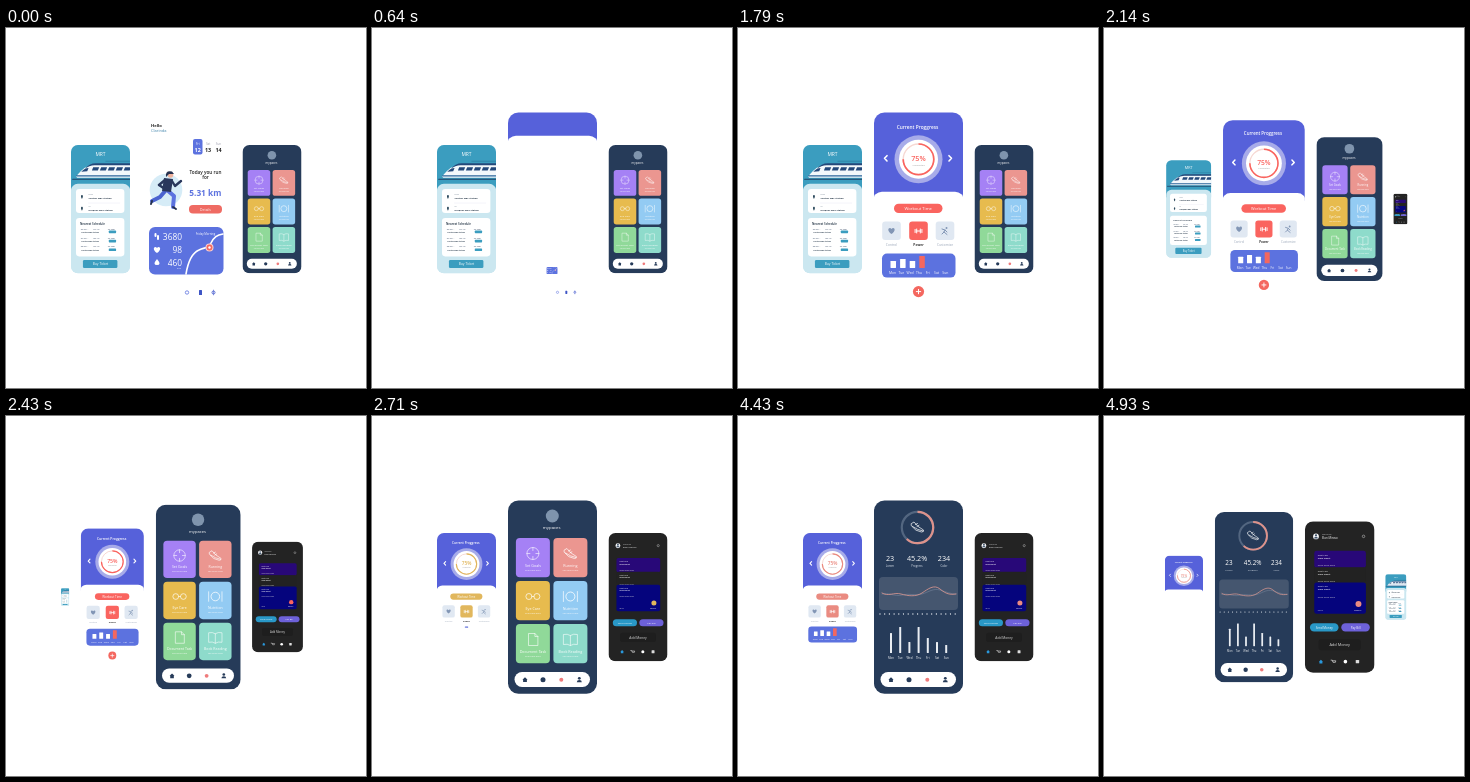
An HTML page that plays this animation: 360x360 px, repeating every 5 s.

```html
<!DOCTYPE html>
<html lang="en">
<head>
<meta charset="utf-8">
<title>App screens</title>
<style>
html, body { margin: 0; width: 100%; height: 100%; overflow: hidden; background: #fff; }
svg { display: block; width: 100vw; height: 100vh; }
text { font-family: "Open Sans", "Noto Sans", sans-serif; }
</style>
</head>
<body>
<svg id="stage" viewBox="0 0 360 360"></svg>
<script>
const LOOP = 5000, FPS = 14;
const NAVY = '#263b59', BLUE = '#5c72df', RED = '#f4675f', TEAL = '#3b9dbf', ACC = 'var(--acc)';

// drawing helpers; every phone is drawn at its centre-stage size
const rect = (x, y, w, h, r, fill) => `<rect x="${x}" y="${y}" width="${w}" height="${h}" rx="${r}" fill="${fill}"/>`;
const disc = (x, y, r, fill) => `<circle cx="${x}" cy="${y}" r="${r}" fill="${fill}"/>`;
const ring = (x, y, r, color, w, extra = '') =>
  `<circle cx="${x}" cy="${y}" r="${r}" fill="none" stroke="${color}" stroke-width="${w}" ${extra}/>`;
const line = (d, color, w, extra = '') =>
  `<path d="${d}" fill="none" stroke="${color}" stroke-width="${w}" stroke-linecap="round" stroke-linejoin="round" ${extra}/>`;
const shape = (d, fill) => `<path d="${d}" fill="${fill}"/>`;
const text = (x, y, size, str, fill, weight = 400, anchor = 'middle', id = '') =>
  `<text x="${x}" y="${y}" font-size="${size}" fill="${fill}" font-weight="${weight}" text-anchor="${anchor}" ${id && `id="${id}"`}>${str}</text>`;
const left = (x, y, size, str, fill, weight) => text(x, y, size, str, fill, weight, 'start');
const group = (id, ...parts) => `<g id="${id}">${parts.join('')}</g>`;
const at = (x, y, body) => `<g transform="translate(${x} ${y})">${body}</g>`;
const days = ['Mon', 'Tue', 'Wed', 'Thu', 'Fri', 'Sat', 'Sun'];

const heart = c => shape('M0 3C-6 -1 -2 -5 0 -2C2 -5 6 -1 0 3Z', c);
const weights = c => line('M-3.4 -1.5V1.5M-1.8 -2V2M1.8 -2V2M3.4 -1.5V1.5M-1.8 0H1.8', c, 1);
const figure = c => disc(1.5, -3, 1, c) + line('M-3 -2L0 -1L2 1M0 -1L-1 1L-3 3M-1 1L2 3.5', c, 1);
const person = c => disc(0, -1.4, 1.4, c) + shape('M-2.5 2.5Q-2.5 .3 0 .3T2.5 2.5Z', c);
const house = c => shape('M-2.6 0L0 -2.5L2.6 0H1.9V2.4H-1.9V0Z', c);
const shoe = c => line('M-6 -3.5L-3.5 -5Q0 0 6 3Q6.5 5 4 5Q-2 4.5 -6 -1ZM-2 -2.5L0 -3.5M-.5 -.5L1.5 -1.7M-5 -.5Q0 3 5.5 4', c, .7);

function ticketPhone() {
  const row = (y, i) => left(-30, y, 3.6, `0${6 + i}.30`, NAVY) + left(-20, y, 3.4, '–', '#888') +
    left(-11, y, 3.6, `0${7 + i}.10`, NAVY) + left(11, y, 3.4, '40 min', NAVY) +
    left(-29, y + 4.6, 2.7, 'Central MRT Station', '#345', 700) + rect(12.5, y + 1.5, 11, 4, 1, TEAL);
  const stop = (y, label, name) => shape(`M-28 ${y + 4}C-33 ${y - 4} -23 ${y - 4} -28 ${y + 4}Z`, '#2d4a5d') +
    left(-18, y - 2, 2.6, label, '#678') + left(-18, y + 4, 3.5, name, '#234', 700);
  const windows = Array.from({ length: 5 }, (_, i) =>
    shape(`M${-13 + i * 12} -58L${-11 + i * 12} -63H${-2 + i * 12}L${-4 + i * 12} -58Z`, '#24487a')).join('');
  return at(180.5, 181,
    rect(-45, -97, 90, 194, 0, '#cbe7f0') + rect(-45, -97, 90, 74, 0, TEAL) +
    text(0, -80, 7.4, 'MRT', '#fff') +
    shape('M-37 -49Q-24 -66 -9 -67H45V-47H-35Z', '#f3f8fb') +
    shape('M-24 -60Q-17 -69 -7 -69H45V-66H-9Q-17 -66 -24 -60Z', '#24487a') +
    shape('M-29 -56Q-24 -62 -18 -62L-20 -57Z', '#24487a') + windows +
    line('M-36 -50H45', '#2b659b', 2) + line('M-42 -45H45', '#1e4267', 1.6) + line('M8 -72H45', '#276b91', .7) +
    rect(-45, -38, 90, 145, 11, '#cbe7f0') +
    rect(-37, -30, 73, 36, 5, '#fff') + stop(-19, 'From', 'Central MRT Station') +
    line('M-18 -9H29', '#dde', .5) + stop(-1.5, 'To', 'Harbour MRT Station') +
    rect(-37, 13.5, 73, 58, 5, '#fff') + left(-31, 23.5, 4.5, 'Nearest Schedule', '#234', 600) +
    [31, 45, 58].map(row).join('') +
    rect(-26.5, 77, 52, 12, 2, TEAL) + text(0, 85, 5, 'Buy Ticket', '#fff'));
}

function runPage() {
  return group('runTop', left(145, 98.7, 4.2, 'Hello', '#222', 700), left(145, 104, 4, 'Clarinda', '#4386ad'),
      rect(187, 111, 9.5, 15.5, 2, BLUE),
      ['Fri', 'Sat', 'Sun'].map((d, i) => text(191.7 + i * 10.4, 116.5, 3, d, i ? '#99a' : '#fff') +
        text(191.7 + i * 10.4, 124, 5.4, 12 + i, i ? '#222' : '#fff', 700)).join('')) +
    group('runMid', disc(160, 162, 16.3, '#d6ecf7'),
      line('M160 162L154 169L146 173', '#4a63d0', 4), line('M161 162L168 168L167 179', BLUE, 4),
      line('M146 173L145 176M167 179L170 181', '#25304e', 2),
      shape('M158 150L167 151L165 164L156 163Z', '#29375c'),
      line('M159 152L153 157L159 161', '#29375c', 2.6), line('M166 153L169 158L175 153', '#29375c', 2.4),
      disc(164.5, 147, 2.8, '#efb29c'), shape('M160 149Q159 142 166 143.5L168 146L163 146Z', '#25304e'),
      text(199.5, 145.5, 4.7, 'Today you run', '#222', 600), text(199.5, 151.2, 4.7, 'for', '#222', 600),
      text(199.3, 167.5, 8.3, '5.31 km', BLUE, 700),
      rect(183, 177, 33, 8.5, 4, '#ef6b63'), text(199.5, 182.5, 3.4, 'Details', '#fff')) +
    group('runCard', rect(143, 199, 74.5, 47.5, 6, BLUE),
      line('M180 246C182 234 186 225 193 222C199 219 202 221 205 215C208 209 211 207 217 206', '#fff', 1.6),
      disc(203.5, 219.5, 4, '#f6c9cb'), disc(203.5, 219.5, 2.9, RED), disc(203.5, 219.5, 1.2, '#fff'),
      text(199.5, 206.7, 2.8, 'Friday Morning', '#fff'),
      [['3680', 211.5], ['98', 224.8], ['460', 237.6]].map(([n, y]) => text(176, y, 8.4, n, '#fff', 400, 'end')).join(''),
      text(173, 240.5, 2.2, 'kcal', '#fff'),
      line('M149.5 206V208M152 208V211', '#fff', 2), at(151, 222, heart('#fff')),
      shape('M151 231Q156 237 151 237Q146 237 151 231Z', '#fff')) +
    group('runNav', ring(181, 264.5, 1.7, BLUE, .8), rect(193, 262, 3, 5, .6, '#3e55c5'),
      at(207.5, 264.5, ring(0, 0, 1.5, '#4a5fcf', .9) + line('M0 -2.4V2.4', '#4a5fcf', .6)));
}

function progressPage() {
  const tab = (x, label, icon, on) => rect(x - 9.3, 193.5, 18.6, 18.6, 3, on ? ACC : '#e0e8f2') +
    at(x, 203, icon(on ? '#fff' : '#8296b5')) + text(x, 218.2, 3.3, label, on ? '#333' : '#99a5b7', on ? 700 : 400);
  const bars = [7, 9, 7, 12].map((h, i) => rect(152.5 + i * 9.6, 240 - h, 5.5, h, .4, i == 3 ? RED : '#fff')).join('');
  return group('hero', rect(136, 84, 89, 88, 0, '#5661da'), rect(135, 163.7, 91, 30, 9, '#fff'),
      text(179.5, 101, 4.8, 'Current Proggress', '#fff', 600),
      line('M149 127.7L146.5 130.3L149 133M211 127.7L213.5 130.3L211 133', '#fff', 1.6)) +
    group('dial', disc(180.5, 131.3, 24, '#a7abe9'), disc(180.5, 131.3, 19.5, '#fff'),
      group('arcs', ring(180.5, 131.3, 15.3, '#f6d8d3', 1.4),
        ring(180.5, 131.3, 15.3, ACC, 1.7, 'id="arc" pathLength="100" transform="rotate(-90 180.5 131.3)"')),
      group('share', text(180.5, 133.3, 7.3, '75%', ACC, 600, 'middle', 'pct'), text(180.5, 137.5, 2.4, 'Completed', '#999'))) +
    group('lower',
      group('action', rect(156, 175.7, 48.5, 9.4, 4.7, ACC), text(180.2, 181.9, 4.2, 'Workout Time', '#fff', 400, 'middle', 'actionText')),
      group('tabs', tab(153.5, 'Control', heart), tab(207, 'Customize', figure)),
      group('tabOn', tab(180.5, 'Power', weights, true)),
      group('week', rect(144, 225.6, 73.5, 24, 5, BLUE), bars,
        days.map((d, i) => text(154.5 + i * 8.8, 246, 3.4, d, '#fff')).join('')),
      group('plus', disc(180.5, 263.6, 5.6, RED), line('M178.3 263.6H182.7M180.5 261.4V265.8', '#fff', 1)));
}

function goalsPhone() {
  const tiles = [
    ['#a581f5', 'Set Goals', ring(0, 0, 6, '#fff', .6) + line('M0 -6V-3M0 3V6M-6 0H-3M3 0H6', '#fff', .6)],
    ['#eb9690', 'Running', shoe('#fff')],
    ['#e7bb4e', 'Eye Care', ring(-4, 0, 3, '#fff', .7) + ring(4, 0, 3, '#fff', .7) + line('M-1 0H1', '#fff', .7)],
    ['#93cbf3', 'Nutrition', ring(0, 0, 4.5, '#fff', .8) + line('M-7 -5V5M7 -5V5', '#fff', .7)],
    ['#90d999', 'Document Task', line('M-4 -6H2L5 -3V6H-4ZM2 -6V-3H5', '#fff', .6)],
    ['#8edbcb', 'Book Reading', line('M0 -4Q-3 -6 -7 -5V5Q-3 4 0 6Q3 4 7 5V-5Q3 -6 0 -4V6', '#fff', .6)]
  ];
  const tile = ([color, label, icon], i) => {
    const x = 143.9 + i % 2 * 37.5, y = 122 + (i >> 1) * 43;
    return group('tile' + i, rect(x, y, 34, 39.2, 4, color), at(x + 17, y + 15.5, icon),
      text(x + 17, y + 28.7, 3.7, label, '#fff'), text(x + 17, y + 33.3, 2.3, 'See more here', '#fff'));
  };
  const stat = (x, n, label) => text(x, 145, 7.2, n, '#fff') + text(x, 151, 2.8, label, '#dde4ee');
  const bars = [20, 26, 11, 26, 15, 11, 8].map((h, i) => group('bar' + i, rect(152 + i * 9.2, 237 - h, 2, h, .5, '#e9edf2')) +
    text(153 + i * 9.2, 243, 2.9, days[i], '#fff')).join('');
  return rect(136, 84, 89, 194, 0, NAVY) +
    group('brand', disc(180.3, 100, 6.5, '#7f94ad'), text(179.7, 113.4, 4.3, 'mypaces', '#fff')) +
    tiles.map(tile).join('') +
    group('gauge', ring(179.5, 111.5, 15.7, '#536680', 2.2),
      ring(179.5, 111.5, 15.7, '#dd928b', 2.2, 'id="gaugeArc" pathLength="100" transform="rotate(-90 179.5 111.5)"'),
      at(179.5, 111, shoe('#fff'))) +
    group('stats', stat(152, '23', 'Lorem'), stat(179, '45.2%', 'Progress'), stat(206, '234', 'Calor')) +
    group('chart', rect(141, 161, 79, 33, 4, '#45566f'),
      line('M144 178C150 176 157 181 164 179S177 180 184 178S195 172 202 174S212 178 218 178', '#75849a', .6),
      line('M144 177C150 181 156 176 163 178S178 181 184 177S196 168 202 173S212 179 218 178', '#e09a92', .8),
      line('M142 198H218', '#e6eaf0', 1.3, 'stroke-dasharray="0 4.7"')) +
    group('bars', bars) +
    rect(142.5, 256, 75.5, 15, 7.5, '#fff') + at(153, 263.7, house(NAVY)) + disc(171, 263.7, 2.5, NAVY) +
    disc(189.3, 263.7, 2, '#ef7b7c') + at(207.3, 263.7, person(NAVY));
}

function walletPhone() {
  const card = (y, h, fill) => rect(-32.5, y, 66, h, 3, fill) + left(-28, y + 6, 2.6, 'Debit Card', '#fff') +
    left(-28, y + 10, 2.8, 'Main Wallet', '#fff', 600) + left(-28, y + 19.2, 3, '0000 0000 0000', '#ddd');
  return at(180.5, 181,
    rect(-44.5, -97, 89, 194, 0, '#232323') +
    disc(-30.3, -77.4, 3.7, '#f3f4f7') + at(-30.3, -77.4, person('#3f5369')) +
    left(-22.6, -79, 2.8, 'Welcome', '#ccc') + left(-22.6, -74, 3.7, 'Elan Mirovo', '#fff') +
    ring(30.5, -77.5, 1.6, '#aaa', .9) +
    card(-59, 21.5, '#280878') + card(-38, 19.5, '#222') + card(-18.5, 40, '#05047d') +
    left(-28, 18, 2.4, '08/28', '#ddd') + disc(24, 9, 3.8, ACC) + text(23, 18, 2.5, 'Balance', '#fff') +
    rect(-38, 33.5, 36.5, 10.7, 5.3, '#2998c7') + text(-19.8, 40.3, 3.8, 'Send Money', '#fff') +
    rect(2, 33.5, 36.5, 10.7, 5.3, '#6d61d9') + text(20.3, 40.3, 3.8, 'Pay Bill', '#fff') +
    rect(-27, 54, 54, 14, 3, '#1e1e1e') + text(0, 63, 5, 'Add Money', '#ddd') +
    at(-24, 82.6, house('#2998dc')) + line('M-11 80.7H-9.5L-8.5 83.5H-5.5L-5 81.5H-9', '#eee', .8) +
    disc(7.3, 82.6, 2.3, '#fff') + rect(20.5, 80.4, 4.4, 4.4, .8, '#ddd'));
}

const svg = document.getElementById('stage');
svg.innerHTML = '<clipPath id="body"><rect x="136" y="84.4" width="89" height="193.4" rx="10.5"/></clipPath>' +
  Object.entries({ ticket: ticketPhone(), run: progressPage() + runPage(), goals: goalsPhone(), wallet: walletPhone() })
    .map(([id, body]) => `<g id="${id}"><g clip-path="url(#body)">${body}</g></g>`).join('');
const el = {};
svg.querySelectorAll('[id]').forEach(n => el[n.id] = n);

// timing helpers
const span = (t, a, b) => Math.min(1, Math.max(0, (t - a) / (b - a)));
const ease = (t, a, b) => (1 - Math.cos(Math.PI * span(t, a, b))) / 2;
const mix = (a, b, k) => a + (b - a) * k;
const fade = (id, k) => el[id].setAttribute('opacity', k);
const move = (id, y) => el[id].setAttribute('transform', `translate(0 ${y})`);
const scale = (id, sx, x, y, sy = sx) => {
  el[id].setAttribute('visibility', sx > .001 && sy > .001 ? 'inherit' : 'hidden');
  el[id].setAttribute('transform', `translate(${x} ${y}) scale(${sx} ${sy}) translate(${-x} ${-y})`);
};
const sweep = (id, pct) => el[id].setAttribute('stroke-dasharray', `${pct} 100`);

// carousel: slots from far left to far right
const slotX = [53.5, 94.5, 180.5, 266, 306], slotScale = [0, .663, 1, .663, 0];
function place(id, slot) {
  slot = Math.min(4, Math.max(0, slot));
  const i = Math.min(3, Math.floor(slot)), k = slot - i;
  const s = mix(slotScale[i], slotScale[i + 1], k);
  el[id].setAttribute('visibility', s > .01 ? 'visible' : 'hidden');
  el[id].setAttribute('transform',
    `translate(${mix(slotX[i], slotX[i + 1], k)} 181) scale(${s}) translate(-180.5 -181)`);
}

// element, start, end, pivot x, pivot y
const exits = [
  ['runTop', 300, 500, 180, 110], ['runMid', 380, 600, 180, 165],
  ['runCard', 460, 700, 180, 246], ['runNav', 560, 760, 194, 264],
  ['brand', 2930, 3150, 180, 106]
];
const tints = [[0, '#e0a077'], [1500, '#fa645f'], [2500, '#e1b75d'], [4000, '#ea8b81']];

function draw(t) {
  const p1 = ease(t, 1922, 2592), p2 = ease(t, 4658, 5328), p = p1 + p2;
  place('ticket', p2 > 0 ? 4 - p2 : 1 - p1);
  place('run', 2 - p);
  place('goals', 3 - p);
  place('wallet', 4 - p);
  svg.style.setProperty('--acc', tints.filter(s => s[0] <= t).pop()[1]);

  for (const [id, a, b, x, y] of exits) scale(id, 1 - ease(t, a, b), x, y);

  move('hero', mix(-112, 0, ease(t, 420, 860)));
  scale('dial', ease(t, 780, 1290), 180.5, 131.3);
  scale('arcs', ease(t, 980, 1390), 180.5, 131.3);
  sweep('arc', 75 * ease(t, 900, 1500));
  fade('share', ease(t, 1200, 1500));
  el.pct.textContent = Math.round(75 * ease(t, 1200, 1700)) + '%';
  scale('action', ease(t, 900, 1140), 180.2, 180.4);
  fade('actionText', ease(t, 1220, 1450));
  move('tabs', 22 * (1 - ease(t, 960, 1340)));
  fade('tabs', ease(t, 960, 1340));
  move('tabOn', 15 * (1 - ease(t, 940, 1320)));
  fade('tabOn', ease(t, 900, 1180));
  const week = t < 2500 ? ease(t, 1110, 1420) : t < 3900 ? 1 - ease(t, 2560, 2740) : ease(t, 4000, 4250);
  scale('week', week, 180.5, 225.6);
  scale('plus', Math.min(ease(t, 1300, 1520), 1 - ease(t, 2480, 2660)), 180.5, 263.6);
  fade('lower', 1 - ease(t, 4600, 4860));

  for (let i = 0; i < 6; i++) {
    const row = i >> 1, start = 3025 + row * 165;
    scale('tile' + i, 1 - ease(t, start, start + 200), 161 + i % 2 * 37.5, 161 + row * 43);
  }
  scale('gauge', ease(t, 3095, 3495), 179.5, 111.5);
  sweep('gaugeArc', 62 * ease(t, 3050, 3700));
  move('stats', 12 * (1 - ease(t, 3110, 3520)));
  fade('stats', ease(t, 3110, 3520));
  scale('chart', ease(t, 3500, 3780), 180.5, 178);
  fade('bars', ease(t, 3640, 3800));
  for (let i = 0; i < 7; i++) scale('bar' + i, 1, 153, 237, ease(t, 3700 + i * 50, 4000 + i * 50));
}

function tick() {
  const now = performance.now() % LOOP;
  const step = Math.floor((now + 5) * FPS / 1000) % (LOOP * FPS / 1000);
  draw(Math.round(step * 100 / FPS) * 10);
  requestAnimationFrame(tick);
}
tick();
</script>
</body>
</html>
```
